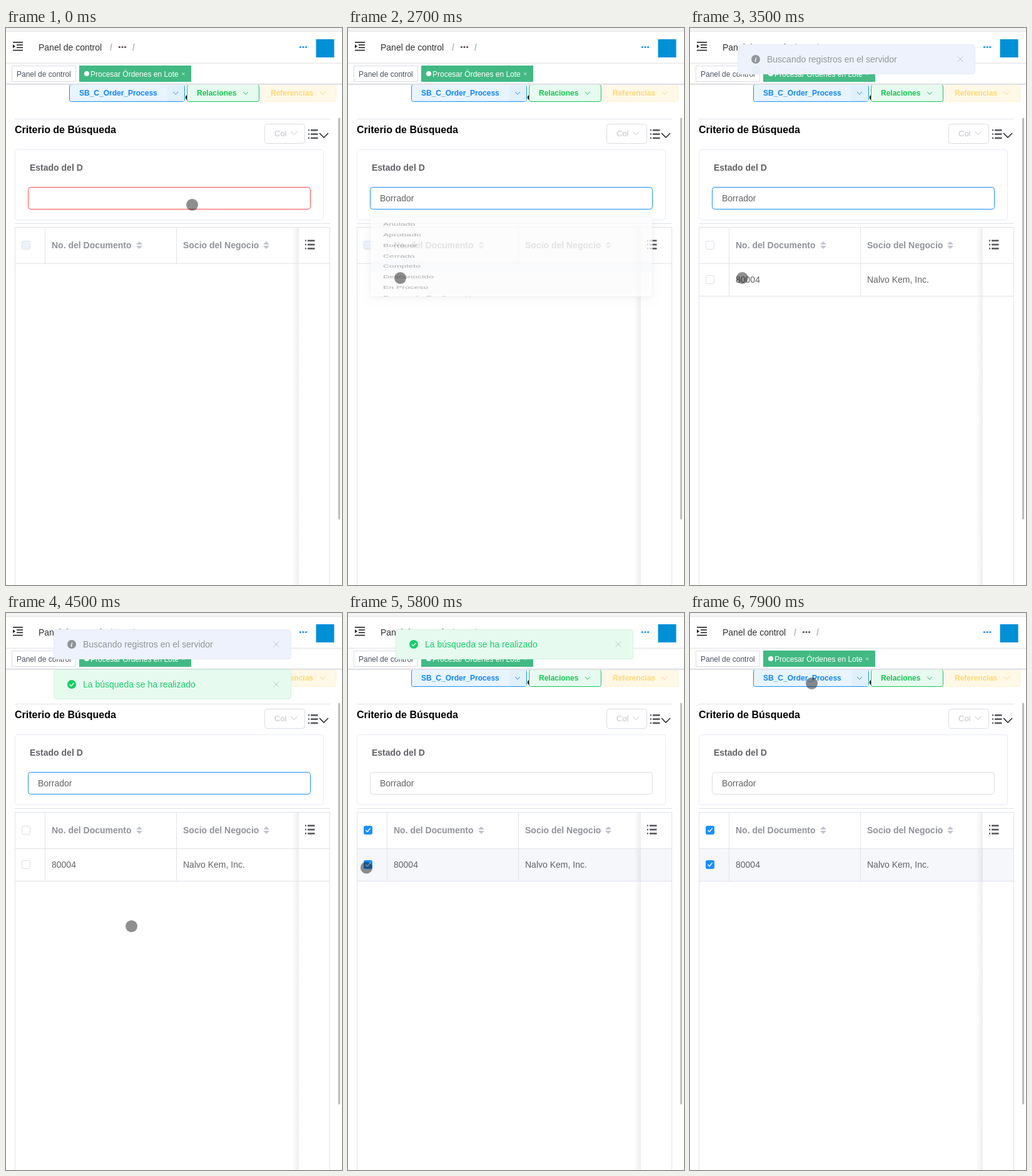
An HTML page with a canvas that plays this animation: 537x890 px, repeating every 8 s.

```html
<!DOCTYPE html>
<html lang="es">
<head>
<meta charset="utf-8">
<title>Procesar Órdenes en Lote</title>
<style>
html, body { margin: 0; width: 100%; height: 100%; overflow: hidden; background: #fff; }
canvas { display: block; width: 537px; height: 890px; }
</style>
</head>
<body>
<canvas id="stage"></canvas>
<script>
const W = 537, H = 890, LOOP = 8000;
const canvas = document.getElementById('stage');
const ctx = canvas.getContext('2d');
const dpr = window.devicePixelRatio || 1;
canvas.width = W * dpr;
canvas.height = H * dpr;

const BLUE = '#1890ff', LINE = '#dfe3e9', GREY = '#c0c4cc', TEXT = '#606266';
const FONT = '"Liberation Sans", Arial, sans-serif';
const OPTIONS = ['Anulado', 'Aprobado', 'Borrador', 'Cerrado', 'Completo',
  'Desconocido', 'En Proceso', 'Espera de Confirmación'];

// Touch pointer stops: time, x, y
const PATH = [
  [2300, 83.5, 399.5], [4100, 83.5, 399.5], [4500, 200.5, 500.5], [4900, 50, 425],
  [5000, 36.5, 413.5], [5300, 29.5, 407], [6100, 29.5, 407], [6200, 77.5, 407],
  [6350, 77.5, 407], [6500, 77.5, 423], [6600, 77.5, 423], [6700, 121.5, 413.5],
  [7400, 234, 263.5], [7500, 234, 263.5], [7600, 219, 205], [7700, 206, 158],
  [7800, 198, 126], [7900, 194.5, 112.5]
];

const clamp = v => Math.max(0, Math.min(1, v));
const mix = (a, b, p) => a + (b - a) * p;
const ramp = (t, start, length) => clamp((t - start) / length);

function bezier(x1, y1, x2, y2) {
  const at = (a, b, u) => 3 * a * u * (1 - u) ** 2 + 3 * b * u * u * (1 - u) + u ** 3;
  return x => {
    let lo = 0, hi = 1;
    for (let i = 0; i < 20; i++) {
      const mid = (lo + hi) / 2;
      if (at(x1, x2, mid) < x) lo = mid; else hi = mid;
    }
    return at(y1, y2, lo);
  };
}
const ease = bezier(.25, .1, .25, 1);
const easeInOut = bezier(.42, 0, .58, 1);
const easeOutQuint = bezier(.23, 1, .32, 1);

function rect(x, y, w, h, color) {
  ctx.fillStyle = color;
  ctx.fillRect(x, y, w, h);
}

function box(x, y, w, h, r, fill, stroke) {
  ctx.beginPath();
  ctx.roundRect(x + .5, y + .5, w - 1, h - 1, r);
  if (fill) { ctx.fillStyle = fill; ctx.fill(); }
  if (stroke) { ctx.strokeStyle = stroke; ctx.lineWidth = 1; ctx.stroke(); }
}

function text(str, x, y, size, color, weight = '') {
  ctx.font = `${weight} ${size}px ${FONT}`;
  ctx.fillStyle = color;
  ctx.fillText(str, x, y);
}

function disc(x, y, r, color) {
  ctx.fillStyle = color;
  ctx.beginPath();
  ctx.arc(x, y, r, 0, Math.PI * 2);
  ctx.fill();
}

function line(points, color, width = 1) {
  ctx.strokeStyle = color;
  ctx.lineWidth = width;
  ctx.beginPath();
  points.forEach(([x, y]) => ctx.lineTo(x, y));
  ctx.stroke();
}

function poly(points, color) {
  ctx.fillStyle = color;
  ctx.beginPath();
  points.forEach(([x, y]) => ctx.lineTo(x, y));
  ctx.fill();
}

const chevron = (x, y, r, color, width = 1) =>
  line([[x - r, y - r / 2], [x, y + r / 2], [x + r, y - r / 2]], color, width);

function dots(x, y, color) {
  for (let i = -1; i <= 1; i++) disc(x + i * 4.6, y, 1.6, color);
}

function listIcon(x, y, color) {
  for (let i = 0; i < 3; i++) {
    rect(x, y + i * 6.3, 2, 2.4, color);
    rect(x + 4, y + i * 6.3, 11.5, 2.6, color);
  }
}

function sortIcon(x) {
  poly([[x - 5, 346], [x, 341], [x + 5, 346]], GREY);
  poly([[x - 5, 348], [x, 353], [x + 5, 348]], GREY);
}

function checkbox(y, checked, disabled) {
  if (checked) {
    box(25, y, 14, 14, 2, BLUE, BLUE);
    line([[28.5, y + 7], [31, y + 9.7], [35.7, y + 4]], '#fff', 1.3);
  } else {
    box(25, y, 14, 14, 2, disabled ? '#edf2fc' : '#fff', '#dcdfe6');
  }
}

function drawHeader() {
  rect(0, 0, W, 90, '#fff');
  rect(0, 0, W, 5, '#f4f4f4');
  rect(0, 5, W, 1, '#e4e4e4');

  const ink = '#222';
  rect(11, 22, 16, 1.6, ink);
  rect(17, 26.3, 10, 1.6, ink);
  rect(17, 30.5, 10, 1.6, ink);
  rect(11, 34.8, 16, 1.6, ink);
  poly([[11, 26.2], [15, 29.2], [11, 32.2]], ink);

  text('Panel de control', 52, 36, 14, '#303133');
  text('/', 166, 36, 14, '#b4b8c0', 'bold');
  dots(186, 30.5, '#5a4d48');
  text('/', 202, 36, 14, '#b4b8c0', 'bold');
  dots(475, 30.5, BLUE);
  rect(495.5, 18, 29, 29, '#0090d6');

  rect(0, 55, W, 1, '#f5f5f5');
  rect(0, 56, W, 1, '#ebebec');
  rect(0, 57, W, 1, '#f8f8f8');
  box(9, 60, 103, 26, 0, '#fff', '#d8dce5');
  text('Panel de control', 17, 78, 12, '#495060');
  rect(117, 60, 179, 26, '#42b983');
  disc(129, 73, 4, '#fff');
  text('Procesar Órdenes en Lote', 135, 78, 12, '#fff');
  line([[281.3, 71.3], [285.3, 75.3]], '#d5f0e4');
  line([[285.3, 71.3], [281.3, 75.3]], '#d5f0e4');
  rect(0, 89, W, 1, '#cfd2d8');
  rect(0, 90, W, 1, '#ececee');
}

function drawButtons() {
  disc(291, 111, 4.2, '#111');
  box(101, 90, 185, 28, 3, '#e8f4ff', BLUE);
  rect(258, 91, 27, 26, '#e0f0fd');
  text('SB_C_Order_Process', 117, 108, 12, '#0f85fa', 'bold');
  chevron(271, 104, 4, BLUE);
  box(289, 90, 116, 28, 3, '#e7faf0', '#14c74f');
  text('Relaciones', 305, 108, 12, '#14c74f', 'bold');
  chevron(383, 104, 4, '#14c74f');
  box(408, 90, 120, 28, 3, '#fff8e6', '#fff1cc');
  text('Referencias', 423, 108, 12, '#ffd876', 'bold');
  chevron(506, 104, 4, '#ffd876');
}

function drawCriteria(t) {
  rect(14, 145, 504, 1, LINE);
  text('Criterio de Búsqueda', 14, 168, 16, '#000', 'bold');
  box(413, 153, 65, 32, 4, '#fff', '#d9dce3');
  text('Col', 429, 173, 13, GREY);
  chevron(460.5, 168, 5, GREY);
  listIcon(483, 162, '#55575c');
  chevron(508, 171.5, 7, '#111', 1.4);

  box(14, 194, 494, 113, 4, '#fff', '#e6ebf5');
  text('Estado del D', 38, 228, 14, TEXT, 'bold');
  const border = t < 2700 ? '#ff4949' : t < 5800 ? BLUE : '#dcdfe6';
  box(35, 254, 452, 36, 4, '#fff', border);
  if (t >= 2700) text('Borrador', 51, 277, 14, TEXT);
  else if (t >= 1130 && (t - 1130) % 1060 < 530) rect(51, 264, 1, 16, '#444');
  rect(14, 312, 504, 1, LINE);
}

function drawTable(t) {
  const hasRow = t >= 3300, checked = t >= 5800;
  rect(14, 318, 504, 572, '#fff');
  if (checked) rect(15, 377, 502, 51, '#f5f7fa');

  const bottom = hasRow ? 428 : 376;
  rect(62, 318, 1, bottom - 318, LINE);
  rect(272, 318, 1, bottom - 318, LINE);
  text('No. del Documento', 73, 352, 14, '#909399', 'bold');
  sortIcon(213);
  text('Socio del Negocio', 283, 352, 14, '#909399', 'bold');
  sortIcon(416);
  checkbox(340, checked, !hasRow);
  if (hasRow) {
    checkbox(395, checked, false);
    text('80004', 73, 407, 14, TEXT);
    text('Nalvo Kem, Inc.', 283, 407, 14, TEXT);
  }
  if (t >= 5600 && t < 5800) rect(15, 391, 47, 24, 'rgba(0,0,0,.18)');

  const shade = ctx.createLinearGradient(457, 0, 468, 0);
  shade.addColorStop(0, 'rgba(0,0,0,0)');
  shade.addColorStop(1, 'rgba(0,0,0,.065)');
  rect(457, 319, 11, 571, shade);
  rect(468, 319, 49, 571, '#fff');
  if (checked) rect(468, 377, 49, 51, '#f5f7fa');
  listIcon(478, 338.5, '#55575c');

  rect(14, 318, 504, 1, LINE);
  rect(14, 376, 504, 1, LINE);
  if (hasRow) rect(14, 428, 504, 1, LINE);
  rect(14, 318, 1, 572, LINE);
  rect(517, 318, 1, 572, LINE);
}

function drawLoading(t) {
  const start = 2835;
  const alpha = ease(ramp(t, start, 280)) * (1 - ease(ramp(t, 3250, 270)));
  if (t < start || alpha <= 0) return;
  ctx.save();
  ctx.globalAlpha = alpha;
  rect(14, 318, 504, 572, 'rgba(255,255,255,.9)');

  const age = t - start, half = easeInOut(clamp(age / 750));
  const perUnit = 1 / 20;
  const from = age / 2000 * Math.PI * 2 + 40 * half * perUnit;
  ctx.strokeStyle = BLUE;
  ctx.lineWidth = 1.7;
  ctx.lineCap = 'round';
  ctx.beginPath();
  ctx.arc(266.5, 649.5, 16.8, from, from + mix(1, 90, half) * perUnit);
  ctx.stroke();
  text('Cargando', 236, 689, 14, BLUE);
  ctx.restore();
}

function drawDropdown(t) {
  const p = easeOutQuint(ramp(t, 960, 300)) * (1 - easeOutQuint(ramp(t, 2660, 300)));
  if (t < 960 || p < .005) return;
  ctx.save();
  ctx.globalAlpha = p;
  ctx.translate(0, 302);
  ctx.scale(1, p);
  ctx.translate(0, -302);

  ctx.save();
  ctx.shadowColor = 'rgba(0,0,0,.1)';
  ctx.shadowBlur = 12 * dpr;
  ctx.shadowOffsetY = 2 * dpr;
  box(35, 302, 452, 259, 4, '#fff');
  ctx.restore();
  box(35, 302, 452, 259, 4, '#fff', '#dfe3ee');
  poly([[70.5, 303.2], [76.5, 297], [82.5, 303.2]], '#fff');
  line([[70.5, 302.5], [76.5, 296.5], [82.5, 302.5]], '#ebeef5');

  ctx.beginPath();
  ctx.rect(36, 303, 450, 257);
  ctx.clip();
  rect(36, 445, 450, 34, '#f5f7fa');
  OPTIONS.forEach((name, i) => text(name, 56, 331 + i * 34, 14, TEXT));
  ctx.restore();
}

function drawMessage(y, alpha, label, success) {
  if (alpha <= 0) return;
  const [fill, edge, color] = success
    ? ['#e7faf0', '#d0f5e0', '#13ce66']
    : ['#edf2fc', '#e6ebf5', '#909399'];
  ctx.save();
  ctx.globalAlpha = alpha;
  ctx.translate(0, y);
  box(76, 0, 380, 48, 4, fill, edge);
  disc(105, 24, 7, color);
  if (success) {
    line([[101.8, 24.2], [104.2, 26.6], [108.6, 21.8]], '#fff', 1.4);
  } else {
    ctx.font = 'italic bold 11px "Liberation Serif", serif';
    ctx.fillStyle = '#fff';
    ctx.fillText('i', 103.3, 28);
  }
  text(label, 123, 29, 14, color);
  line([[427.5, 19.5], [436.5, 28.5]], GREY);
  line([[436.5, 19.5], [427.5, 28.5]], GREY);
  ctx.restore();
}

function drawMessages(t) {
  const infoIn = ramp(t, 2865, 400), infoOut = ramp(t, 4765, 400);
  const infoY = mix(-22, 26, ease(infoIn)) - 48 * ease(infoOut);
  const infoAlpha = ease(ramp(t, 2865, 300)) * (1 - ease(ramp(t, 4765, 300)));
  drawMessage(infoY, infoAlpha, 'Buscando registros en el servidor', false);

  const doneY = mix(42, 90, ease(ramp(t, 3490, 260)))
    - 64 * ease(infoOut) - 48 * ease(ramp(t, 6102, 400));
  const doneAlpha = ease(ramp(t, 3490, 200)) * (1 - ease(ramp(t, 6102, 300)));
  drawMessage(doneY, doneAlpha, 'La búsqueda se ha realizado', true);
}

function pointerAt(t) {
  if (t < 2300) {
    const p = 1 - (1 - ramp(t, 1300, 1000)) ** 1.55;
    return [mix(297.5, 83.5, p), mix(282.5, 399.5, p)];
  }
  const next = PATH.findIndex(stop => stop[0] > t);
  if (next < 0) return PATH[PATH.length - 1].slice(1);
  const [t0, x0, y0] = PATH[next - 1], [t1, x1, y1] = PATH[next];
  const p = (t - t0) / (t1 - t0);
  return [mix(x0, x1, p), mix(y0, y1, p)];
}

function draw(t) {
  ctx.setTransform(dpr, 0, 0, dpr, 0, 0);
  rect(0, 0, W, H, '#fff');
  drawButtons();
  drawHeader();
  drawCriteria(t);
  drawTable(t);
  drawLoading(t);
  rect(531, 144, 3, 641, '#bcbcbc');
  drawDropdown(t);
  drawMessages(t);
  disc(...pointerAt(t), 9.5, 'rgba(24,24,24,.49)');
}

const began = performance.now();
function tick() {
  // Motion advances in tenths of a second, like a screen recording
  const t = (performance.now() - began) % LOOP;
  draw(Math.floor(t / 100) * 100);
  requestAnimationFrame(tick);
}
tick();
</script>
</body>
</html>
```
